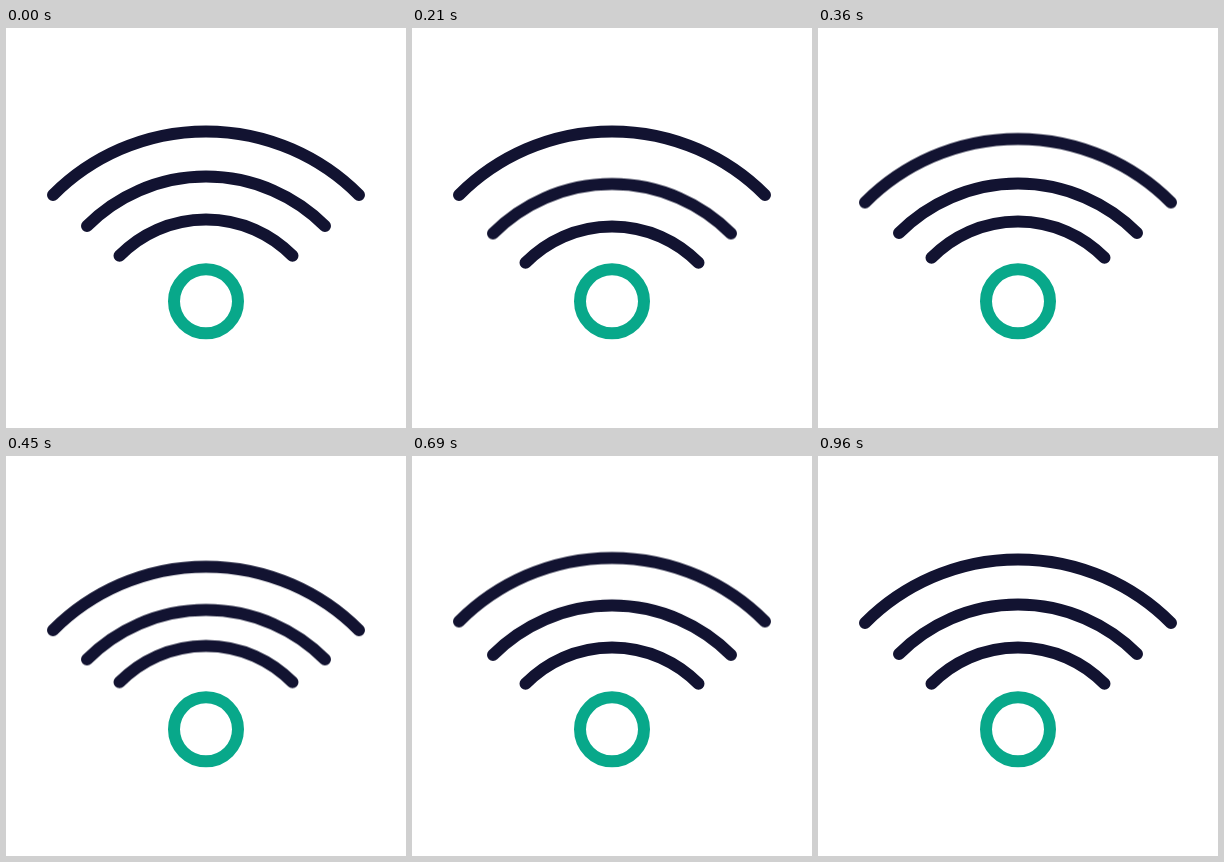
These frames come from a looping animation (400 px wide and 400 px high, 3.05 s). An HTML page without scripts:

```html
<!DOCTYPE html>
<html lang="en">
<head>
<meta charset="utf-8">
<title>Wireless signal</title>
<style>
  html, body {
    margin: 0;
    width: 100%;
    height: 100%;
    overflow: hidden;
    background: #fff;
  }
  svg {
    display: block;
    width: 100%;
    height: 100%;
    fill: none;
    stroke-width: 12;
    stroke-linecap: round;
  }
  .wave {
    stroke: #121331;
    animation: bounce 3050ms infinite;
    animation-delay: calc(var(--i) * 150ms - 2ms);
  }
  .dot { stroke: #08a88a; }

  /* Dip, hold, spring back; stepped every 30 ms */
  @keyframes bounce {
    0%        { transform: translateY(0);      animation-timing-function: steps(2); }
    1.96721%  { transform: translateY(7.5px);  animation-timing-function: steps(5); }
    6.88525%  { transform: translateY(7px);    animation-timing-function: steps(3); }
    9.83607%  { transform: translateY(5.4px);  animation-timing-function: steps(2); }
    11.80328% { transform: translateY(2px);    animation-timing-function: steps(1); }
    12.78689% { transform: translateY(-1.5px); animation-timing-function: steps(1); }
    13.77049% { transform: translateY(-2.6px); animation-timing-function: steps(2); }
    15.73770% { transform: translateY(-.6px);  animation-timing-function: steps(2); }
    17.70492% { transform: translateY(.9px);   animation-timing-function: steps(4); }
    21.63934%, 100% { transform: translateY(0); }
  }
</style>
</head>
<body>
<svg viewBox="0 0 400 400">
  <path class="wave" style="--i:0" d="M113.5 227.8A121 121 0 0 1 286.5 227.8"/>
  <path class="wave" style="--i:1" d="M81 198A168 168 0 0 1 319 198"/>
  <path class="wave" style="--i:2" d="M47 167A216 216 0 0 1 353 167"/>
  <circle class="dot" cx="200" cy="273.3" r="32"/>
</svg>
</body>
</html>
```
